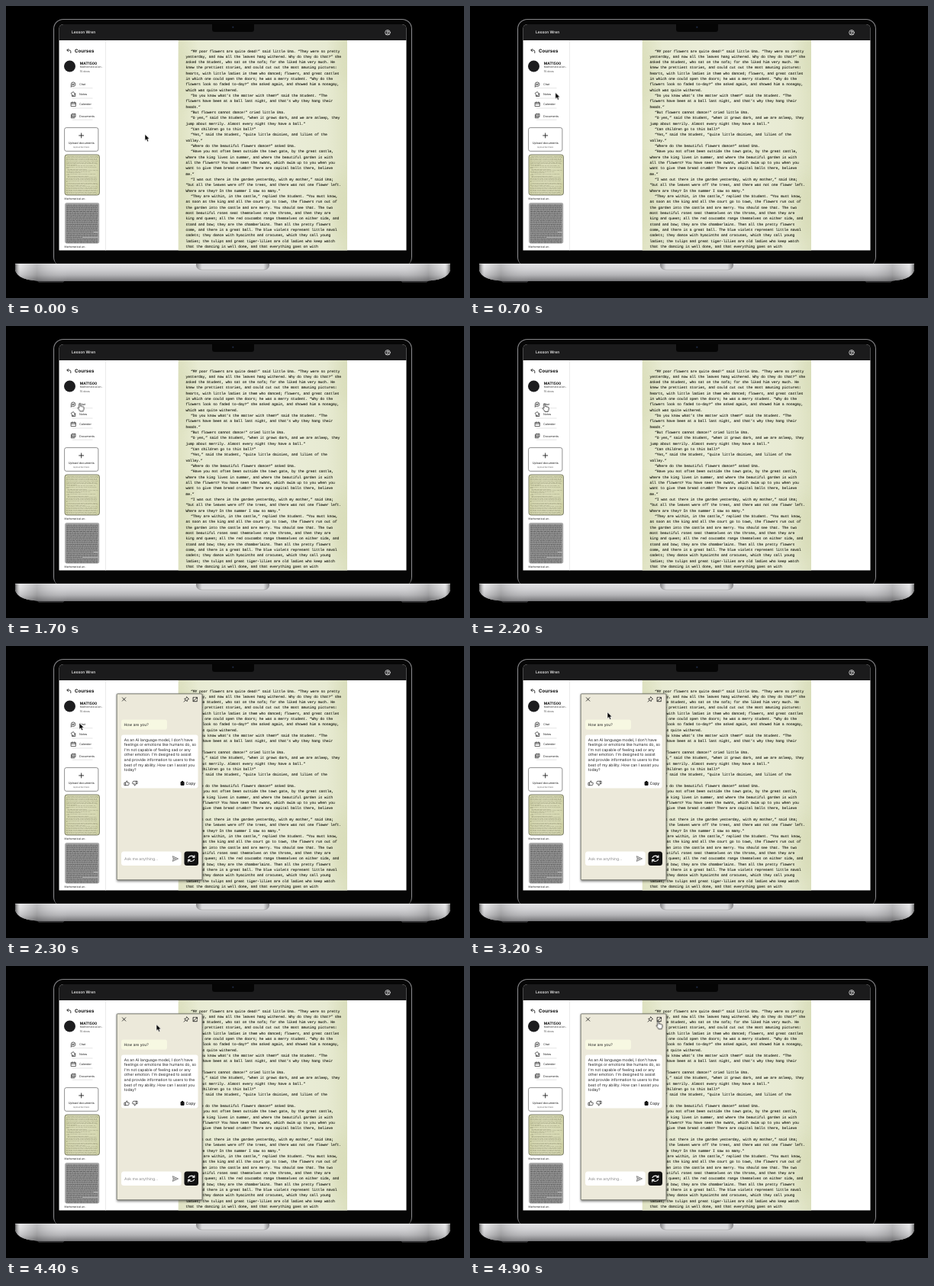
Animation, 600 px wide and 383 px high, one loop 5 s. Source, as an HTML page:

```html
<!DOCTYPE html>
<html lang="en">
<head>
<meta charset="utf-8">
<title>Study app on a laptop</title>
<style>
html, body { margin: 0; width: 100%; height: 100%; overflow: hidden; background: #000; }
svg { display: block; width: 100%; height: 100%; }
text { font-family: Inter, "Open Sans", sans-serif; fill: #222; text-rendering: geometricPrecision; }
.page text { font-family: "Liberation Mono", "DejaVu Sans Mono", monospace; font-size: 4.8px; letter-spacing: -.13px; fill: #25271d; stroke: #25271d; stroke-width: .12px; }
.menu text { font-size: 3.7px; }
.reply text { font-size: 5.05px; }
.line { fill: none; stroke: #222; stroke-width: .7; stroke-linecap: round; stroke-linejoin: round; }
.panel { animation: open 5s step-end infinite; }
.cursor { animation: move 5s infinite; }
.arrow { animation: arrow 5s step-end infinite; }
.hand { animation: hand 5s step-end infinite; }
@keyframes open { 0% { visibility: hidden } 45.98%, 100% { visibility: visible } }
@keyframes arrow {
  0% { visibility: visible } 17.98% { visibility: hidden }
  45.98% { visibility: visible } 93.98%, 100% { visibility: hidden }
}
@keyframes hand {
  0% { visibility: hidden } 17.98% { visibility: visible }
  45.98% { visibility: hidden } 93.98%, 100% { visibility: visible }
}
@keyframes move {
  0% { transform: translate(182px, 168.3px); animation-timing-function: ease-in-out }
  20%, 26% { transform: translate(95.7px, 101px); animation-timing-function: linear }
  44% { transform: translate(97.7px, 102px) }
  45.98%, 60% { transform: translate(96px, 101px); animation-timing-function: ease-out }
  64% { transform: translate(180px, 86.8px); animation-timing-function: ease-in-out }
  80% { transform: translate(163px, 79.6px); animation-timing-function: ease-in-out }
  98%, 100% { transform: translate(246.6px, 72.3px) }
}
</style>
</head>
<body>
<svg viewBox="0 0 600 383" xmlns="http://www.w3.org/2000/svg">
  <defs>
    <linearGradient id="metal" x2="0" y2="1">
      <stop offset="0" stop-color="#e2e2e4"/><stop offset=".35" stop-color="#cfcfd2"/>
      <stop offset=".65" stop-color="#b4b4b7"/><stop offset="1" stop-color="#77777a"/>
    </linearGradient>
    <linearGradient id="ends">
      <stop offset="0" stop-color="#333" stop-opacity=".75"/><stop offset=".012" stop-color="#fff" stop-opacity=".25"/>
      <stop offset=".05" stop-color="#555" stop-opacity=".25"/><stop offset=".12" stop-color="#fff" stop-opacity="0"/>
      <stop offset=".88" stop-color="#fff" stop-opacity="0"/><stop offset=".95" stop-color="#555" stop-opacity=".25"/>
      <stop offset=".988" stop-color="#fff" stop-opacity=".25"/><stop offset="1" stop-color="#333" stop-opacity=".75"/>
    </linearGradient>
    <linearGradient id="lip">
      <stop offset="0" stop-color="#88888b"/><stop offset=".08" stop-color="#dcdcde"/>
      <stop offset=".92" stop-color="#dcdcde"/><stop offset="1" stop-color="#88888b"/>
    </linearGradient>
    <linearGradient id="paper">
      <stop offset="0" stop-color="#dfe2c2"/><stop offset=".12" stop-color="#e8ebd3"/>
      <stop offset=".5" stop-color="#eceedb"/><stop offset=".88" stop-color="#e7ead2"/><stop offset="1" stop-color="#dde1c1"/>
    </linearGradient>
    <filter id="soft" x="-50%" y="-50%" width="200%" height="200%"><feGaussianBlur stdDeviation="9"/></filter>
    <filter id="shade" x="-10%" y="-10%" width="120%" height="120%"><feGaussianBlur stdDeviation="1.6"/></filter>
    <clipPath id="screen"><path d="M69.5 320.5V30q0-6 6-6H518.500q6 0 6 6V320.500z"/></clipPath>
    <clipPath id="sheet"><rect x="225.500" y="45" width="221.500" height="276"/></clipPath>
    <clipPath id="thumb"><rect x="77" y="195" width="45.500" height="53" rx="3"/></clipPath>
    <clipPath id="thumb2"><rect x="77" y="258" width="45.500" height="53.500" rx="3"/></clipPath>
  </defs>

  <rect width="600" height="383"/>
  <rect x="62" y="17" width="470" height="325" rx="13" fill="#87878a"/>
  <rect x="63.100" y="18.100" width="467.800" height="324" rx="12" fill="#060606"/>

  <g clip-path="url(#screen)">
    <rect x="69" y="24" width="456" height="297" fill="#fff"/>
    <rect x="69" y="24" width="456" height="21" fill="#1b1b1c"/>
    <text x="86" y="36.300" font-size="5" font-weight="500" style="fill:#fff">Lesson Wren</text>
    <g class="line" style="stroke:#fff;stroke-width:.7">
      <circle cx="500" cy="34.800" r="3.300"/><circle cx="500" cy="33.900" r="1.100"/><path d="M497.900 37.200q2.100-2.300 4.200 0"/>
    </g>
    <path d="M130.500 45V321" stroke="#e2e2e2" stroke-width=".7"/>

    <g id="page" class="page" clip-path="url(#sheet)">
      <rect x="225.500" y="45" width="221.500" height="276" fill="url(#paper)"/>
      <g filter="url(#soft)" fill="#cfd3a8" opacity=".4">
        <ellipse cx="229" cy="90" rx="7" ry="40"/><ellipse cx="232" cy="250" rx="8" ry="50"/>
        <ellipse cx="444" cy="70" rx="7" ry="30"/><ellipse cx="440" cy="265" rx="12" ry="45"/>
        <ellipse cx="330" cy="318" rx="70" ry="6"/>
      </g>
      <g id="story"></g>
    </g>

    <path class="line" style="stroke-width:.9" d="M81.600 56.300l-1.700 1.700 1.700 1.700M80 58h3.200q1.600 0 1.600 1.500v2"/>
    <text x="90" y="61.200" font-size="6.200" font-weight="700" style="fill:#111">Courses</text>
    <circle cx="83.500" cy="79" r="7.500" fill="#1d1d1f"/>
    <text x="96.700" y="76.500" font-size="4.850" font-weight="700" style="fill:#111">MAT1500</text>
    <text x="96.700" y="81" font-size="3.600" style="fill:#444">Mathematical an..</text>
    <text x="96.700" y="87.100" font-size="3.600" style="fill:#444">15 docs</text>

    <g class="menu">
      <text x="96" y="104.100">Chat</text><text x="96" y="117.100">Notes</text>
      <text x="96" y="130.100">Calender</text><text x="96" y="145.600">Documents</text>
      <path d="M87 107.700H113.500M87 121H113.500M87 134H113.500M87 149.300H113.500" stroke="#c4c4c4" stroke-width=".45"/>
      <g class="line">
        <path d="M85.300 106v-3.300a2.800 2.800 0 1 1 2.800 2.800q-1 .1-1.400-.2zM86.700 102.200h2.900M86.700 103.500h2"/>
        <path d="M85.600 114.200l2.700-1.700 2.200 3.500-2.700 1.800zM86.500 117.300v1.200h4.300v-4"/>
        <path d="M85.500 126.600h5.800v5h-5.800zM85.500 128.300h5.800M87 125.800v1.300M89.800 125.800v1.300"/>
        <path d="M86.800 141.300h4.200v4.200h-4.200zM85.400 142.600v4.300h4.300M87.800 142.800h2.200M87.800 144h2.200"/>
      </g>
    </g>

    <rect x="76.600" y="159.600" width="44.300" height="30.800" rx="2.500" fill="#fff" stroke="#555" stroke-width=".65"/>
    <path class="line" style="stroke-width:.9" d="M95.700 169.900h6M98.700 166.900v6"/>
    <g text-anchor="middle">
      <text x="98.700" y="180.800" font-size="3.800">Upload documents</text>
      <text x="98.700" y="185.700" font-size="2.650" style="fill:#555">Upload text here</text>
    </g>
    <g clip-path="url(#thumb)">
      <use href="#page" transform="translate(77 195) scale(.2055) translate(-225.500 -46)"/>
      <rect x="77" y="195" width="45.500" height="53" fill="#b7b676" opacity=".34"/>
    </g>
    <rect x="77" y="195" width="45.500" height="53" rx="3" fill="none" stroke="#55573f" stroke-width=".7"/>
    <text x="76.600" y="253.800" font-size="3.400">Mathematical an..</text>
    <g clip-path="url(#thumb2)">
      <rect x="77" y="258" width="45.500" height="54" fill="#a9a9a9"/>
      <g id="rows" stroke="#4c4c4c" stroke-width=".8"></g>
    </g>
    <text x="76.600" y="316.900" font-size="3.400">Mathematical an..</text>

    <g class="panel">
      <rect x="145" y="63" width="113" height="246" rx="1" fill="#000" opacity=".45" filter="url(#shade)"/>
      <rect x="145.200" y="62.800" width="111.800" height="244" rx="1" fill="#ece9da" stroke="#55564c" stroke-width=".7"/>
      <g class="line" style="stroke-width:.85">
        <path d="M152.400 67.700l4.400 4.400M156.800 67.700l-4.400 4.400"/>
        <path d="M236.900 66.900l2.700 2.700-1.200.4-1 1.200-.2 1.500-3.500-3.500 1.500-.2 1.200-1zM235.200 71.100l-2 2"/>
        <path d="M246.900 67.300h-1.800v5.400h5.200v-1.800M248.200 67.300h2.300v2.300M250.300 67.500l-2.700 2.700M245.300 72.500l1.900-1.900"/>
      </g>
      <rect x="151" y="96.500" width="60" height="13.200" rx="3" fill="#f7f8e2"/>
      <text x="154.600" y="105" font-size="5">How are you?</text>
      <rect x="151" y="116.500" width="100.500" height="70" rx="3" fill="#fff"/>
      <g class="reply" id="reply"></g>
      <g class="line">
        <path id="like" d="M155.300 179.300h1.300v3.400h-1.300zM156.600 179.500l1.500-2.600q1.200.1.900 1.300l-.3 1h2.100q.7.100.5.900l-.6 2q-.2.600-.8.600h-3.300"/>
        <use href="#like" transform="rotate(180 163.500 180)"/>
      </g>
      <rect x="228.600" y="177.900" width="5" height="5" rx=".8" fill="#161616"/><rect x="229.900" y="177" width="2.400" height="1.700" rx=".5" fill="#161616"/>
      <text x="235.600" y="181.900" font-size="5" font-weight="500">Copy</text>
      <rect x="151" y="269.500" width="78.700" height="18.500" rx="3.500" fill="#fff"/>
      <text x="155" y="280.500" font-size="5.100" style="fill:#8b8b8b">Ask me anything...</text>
      <path d="M218.300 275.600l7.400 3.400-7.400 3.400.9-3.400z" fill="#d4d4d4" stroke="#666" stroke-width=".7" stroke-linejoin="round"/>
      <path d="M219.200 279h3.500" stroke="#666" stroke-width=".7"/>
      <rect x="233.500" y="269.500" width="18.500" height="18.500" rx="3.500" fill="#121212"/>
      <path class="line" style="stroke:#fff;stroke-width:1.100" d="M239 277.600q1.200-2.500 4-2.500 2 0 3.700 1.900M246.900 274.700v2.500h-2.500M246.600 280q-1.200 2.500-4 2.500-2 0-3.700-1.900M238.700 282.900v-2.500h2.500"/>
    </g>

    <g class="cursor">
      <path class="arrow" d="M0 0v8.300l1.900-1.700 1.300 3 1.600-.7-1.300-2.900h2.600z" fill="#000" stroke="#fff" stroke-width=".6"/>
      <path class="hand" d="M-1 1.100q0-1 1-1t1 1v2.600q1-.5 1.700.3 1-.4 1.500.4 1.200-.2 1.200 1.100v1.700q0 1.300-.8 2.100v1h-4.300q-.6-1.500-2.600-3.700-.4-1.300.8-1l.5.400z" fill="#fff" stroke="#000" stroke-width=".75" stroke-linejoin="round"/>
    </g>
  </g>

  <path d="M270 23.500h55v7q0 3.500-3.500 3.500h-48q-3.500 0-3.500-3.500z" fill="#050505"/>
  <circle cx="297.300" cy="27.800" r="1.300" fill="#151c2b"/><circle cx="297.300" cy="27.800" r=".5" fill="#2c3f66"/>

  <path d="M40 360h37l-2 2.700H43zM517 360h37l-3 2.700H519z" fill="#303032"/>
  <path id="base" d="M12 338H582V346Q579 360.800 545 360.800H49Q15 360.800 12 346z" fill="url(#metal)"/>
  <use href="#base"/>
  <path d="M12 338H582V346Q579 360.800 545 360.800H49Q15 360.800 12 346z" fill="url(#ends)"/>
  <path d="M12 338.300H582" stroke="#f0f0f1" stroke-width=".6"/>
  <path d="M249 338h96v2q-1 6-8 6H257q-7 0-8-6z" fill="url(#lip)"/>
  <path d="M249 340q1 6 8 6H337q7 0 8-6" fill="none" stroke="#98989b" stroke-width=".5"/>
</svg>
<script>
const story = ` “MY poor flowers are quite dead!” said little Una. “They were so pretty
yesterday, and now all the leaves hang withered. Why do they do that?” she
asked the Student, who sat on the sofa; for she liked him very much. He
knew the prettiest stories, and could cut out the most amusing pictures:
hearts, with little ladies in them who danced; flowers, and great castles
in which one could open the doors; he was a merry student. “Why do the
flowers look so faded to-day?” she asked again, and showed him a nosegay,
which was quite withered.
 “Do you know what’s the matter with them?” said the Student. “The
flowers have been at a ball last night, and that’s why they hang their
heads.”
 “But flowers cannot dance!” cried little Una.
 “O yes,” said the Student, “when it grows dark, and we are asleep, they
jump about merrily. Almost every night they have a ball.”
 “Can children go to this ball?”
 “Yes,” said the Student, “quite little daisies, and lilies of the
valley.”
 “Where do the beautiful flowers dance?” asked Una.
 “Have you not often been outside the town gate, by the great castle,
where the king lives in summer, and where the beautiful garden is with
all the flowers? You have seen the swans, which swim up to you when you
want to give them bread crumbs? There are capital balls there, believe
me.”
 “I was out there in the garden yesterday, with my mother,” said Una;
“but all the leaves were off the trees, and there was not one flower left.
Where are they? In the summer I saw so many.”
 “They are within, in the castle,” replied the Student. “You must know,
as soon as the king and all the court go to town, the flowers run out of
the garden into the castle and are merry. You should see that. The two
most beautiful roses seat themselves on the throne, and then they are
king and queen; all the red coxcombs range themselves on either side, and
stand and bow; they are the chamberlains. Then all the pretty flowers
come, and there is a great ball. The blue violets represent little naval
cadets; they dance with hyacinths and crocuses, which they call young
ladies; the tulips and great tiger-lilies are old ladies who keep watch
that the dancing is well done, and that everything goes on with`;

const reply = `As an AI language model, I don't have
feelings or emotions like humans do, so
I'm not capable of feeling sad or any
other emotion. I'm designed to assist
and provide information to users to the
best of my ability. How can I assist you
today?`;

function add(parent, tag, attrs, text = "") {
  const el = document.createElementNS("http://www.w3.org/2000/svg", tag);
  for (const key in attrs) el.setAttribute(key, attrs[key]);
  el.textContent = text;
  document.getElementById(parent).append(el);
}

function setLines(id, text, x, y, step) {
  text.split("\n").forEach((line, i) =>
    add(id, "text", { x: line[0] === " " ? x + 6.5 : x, y: y + i * step }, line.trim()));
}

setLines("story", story, 235.5, 60.5, 7.33);
setLines("reply", reply, 154.8, 124.8, 6.55);

// small rows of words on the grey thumbnail
let seed = 7;
const rand = () => (seed = seed * 16807 % 2147483647) / 2147483647;
for (let y = 261; y < 311; y += 1.7) {
  const dash = Array.from({ length: 6 }, (_, i) => (i % 2 ? .4 : 1 + rand() * 2.6).toFixed(1));
  add("rows", "path", { d: `M79 ${y.toFixed(1)}H${(rand() < .15 ? 100 + rand() * 15 : 120.5).toFixed(1)}`, "stroke-dasharray": dash.join(" ") });
}
</script>
</body>
</html>
```
